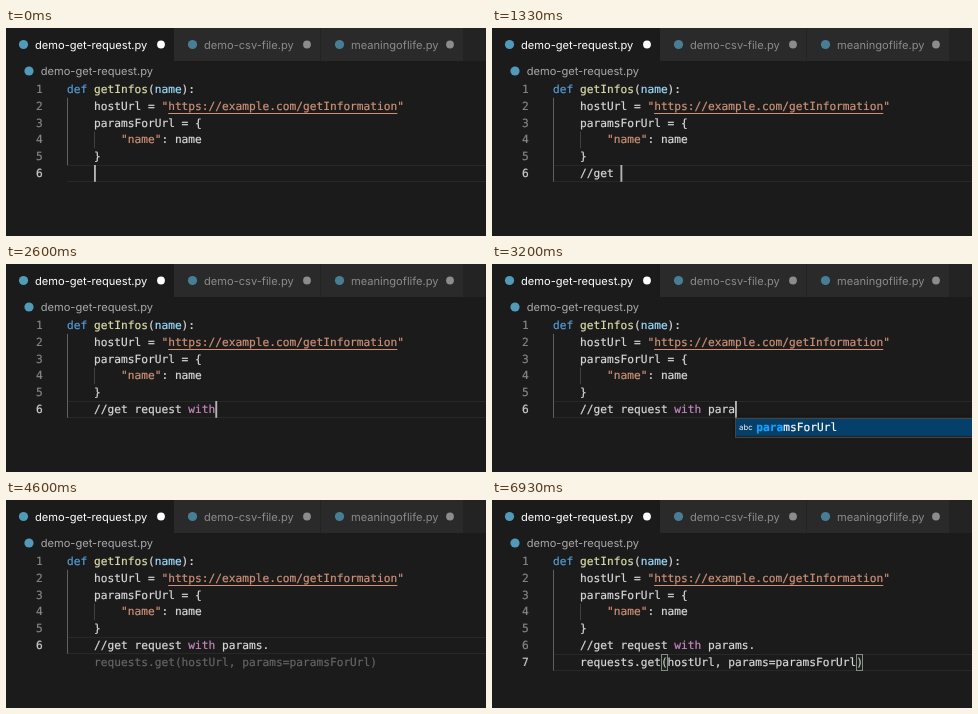
Animation of 480x208 px, one loop 7270 ms. Source, as an HTML page with a canvas:

```html
<!DOCTYPE html>
<html lang="en">
<head>
<meta charset="utf-8">
<title>Code completion</title>
<style>
  html, body { margin: 0; width: 100%; height: 100%; overflow: hidden; background: #1b1b1b; }
  canvas { display: block; width: 480px; height: 208px; }
</style>
</head>
<body>
<canvas id="stage"></canvas>
<script>
const LOOP = 7270;
const CHAR = 6.74, ROW = 16.8, LEFT = 88, TOP = 53;
const MONO = '11.2px "DejaVu Sans Mono", "Liberation Mono", monospace';
const UI = 'Inter, "DejaVu Sans", sans-serif';
const C = {
  bg: '#1b1b1b', tab: '#2a2a2a', strip: '#232323', text: '#d8d8d8', white: '#ffffff',
  keyword: '#569cd6', func: '#dcdcaa', param: '#9cdcfe', string: '#ce9178', flow: '#c586c0',
  ghost: '#656565', gutter: '#858585', active: '#cccccc', match: '#18a3ff', pick: '#04406a',
  border: '#454545', cursor: '#b4b4b2', icon: '#519aba'
};

const canvas = document.getElementById('stage');
const ctx = canvas.getContext('2d');
const dpr = window.devicePixelRatio || 1;
canvas.width = 480 * dpr;
canvas.height = 208 * dpr;
ctx.scale(dpr, dpr);
ctx.textRendering = 'geometricPrecision';

// Typed comment and the moment each character lands.
const COMMENT = '//get request with params.';
const KEYS = [
  730, 800, 1000, 1070, 1200, 1270, 1400, 1470, 1730,
  1870, 1930, 2000, 2130, 2200, 2330, 2400, 2530, 2600,
  2800, 2870, 3000, 3130, 3200, 3330, 3470, 3730
];
const CALL = 'requests.get(hostUrl, params=paramsForUrl)';
const GHOST_AT = 4600, BAR_AT = 5000, ACCEPT_AT = 6470, BRACKETS_AT = 6530;

// Spans in which the cursor is dark.
const DARK = [[70, 470], [4200, 4730], [5200, 5730], [6200, 6470], [6930, LOOP]];

const CODE = [
  [0, [['def ', C.keyword], ['getInfos', C.func], ['(', C.text], ['name', C.param], ['):', C.text]]],
  [4, [['hostUrl = ', C.text], ['"https://example.com/getInformation"', C.string]]],
  [4, [['paramsForUrl = {', C.text]]],
  [8, [['"name"', C.string], [': name', C.text]]],
  [4, [['}', C.text]]]
];

const colX = col => LEFT + (col - 4) * CHAR;
const rowY = line => TOP + (line - 1) * ROW;

function rect(x, y, w, h, color) {
  ctx.fillStyle = color;
  ctx.fillRect(x, y, w, h);
}

function dot(x, y, r, color) {
  ctx.fillStyle = color;
  ctx.beginPath();
  ctx.arc(x, y, r, 0, Math.PI * 2);
  ctx.fill();
}

// Monospaced text on an exact grid, slightly thickened; y is the top of the row.
function mono(str, x, y, color, bold) {
  ctx.font = (bold ? 'bold ' : '') + MONO;
  ctx.fillStyle = ctx.strokeStyle = color;
  ctx.lineWidth = 0.2;
  [...str].forEach((ch, i) => {
    ctx.fillText(ch, x + i * CHAR, y + 12.05);
    ctx.strokeText(ch, x + i * CHAR, y + 12.05);
  });
}

function tokens(list, x, y) {
  for (const [str, color] of list) {
    mono(str, x, y, color);
    x += str.length * CHAR;
  }
}

function label(str, x, y, size, color) {
  ctx.font = `${size}px ${UI}`;
  ctx.fillStyle = color;
  ctx.fillText(str, x, y);
}

function tab(x, w, name, textX, dotX, active) {
  rect(x, 0, w, 33, active ? C.bg : C.tab);
  ctx.globalAlpha = active ? 1 : 0.75;
  dot(textX - 11.5, 16.5, 4.6, C.icon);
  ctx.globalAlpha = 1;
  label(name, textX, 20.6, 11.1, active ? C.white : '#8b8b8b');
  dot(dotX, 16.5, 3.9, active ? C.white : '#8c8c8c');
}

function drawHeader() {
  rect(0, 0, 480, 33, C.strip);
  tab(0, 168, 'demo-get-request.py', 29, 155, true);
  tab(168, 146, 'demo-csv-file.py', 198, 301, false);
  tab(315, 142, 'meaningoflife.py', 345, 444, false);
  dot(23, 43, 4.6, C.icon);
  label('demo-get-request.py', 34.7, 47, 11.1, '#a9a9a9');
}

// The indent guide reaches only the lines that hold text.
function drawCode(line, lastFilled) {
  const top = rowY(line);
  rect(61, Math.round(top), 419, 1, '#282828');
  rect(61, Math.round(top + ROW) - 1, 419, 1, '#282828');
  rect(61, rowY(2), 1, (lastFilled - 1) * ROW, '#606060');
  rect(LEFT, rowY(4), 1, ROW, '#404040');
  CODE.forEach(([col, list], i) => tokens(list, colX(col), rowY(i + 1)));
  rect(colX(15), 85, 34 * CHAR, 1, C.string);
  for (let n = 1; n <= line; n++) {
    mono(String(n), 30, rowY(n), n === line ? C.active : C.gutter);
  }
}

function drawComment(count) {
  const typed = COMMENT.slice(0, count);
  const list = count < 18
    ? [[typed, C.text]]
    : [[typed.slice(0, 14), C.text], ['with', C.flow], [typed.slice(18), C.text]];
  tokens(list, LEFT, rowY(6));
}

function suggestions(count) {
  if (count >= 3 && count <= 5) return [count - 2, ['getInformation', 'getInfos']];
  if (count === 7 || count === 8) return [count - 6, ['return', 'reader', 'read']];
  if (count === 20) return [1, ['paramsForUrl', 'print']];
  if (count > 20 && count < 26) return [count - 19, ['paramsForUrl']];
  return null;
}

function drawPopup(x, [matched, words]) {
  const y = Math.round(rowY(7)), h = Math.round(words.length * ROW + 2);
  ctx.save();
  ctx.shadowColor = 'rgba(0,0,0,.5)';
  ctx.shadowBlur = 4;
  rect(x, y, 500, h, C.strip);
  ctx.restore();
  ctx.strokeStyle = C.border;
  ctx.lineWidth = 1;
  ctx.strokeRect(Math.round(x) + 0.5, y + 0.5, 500, h);
  words.forEach((word, i) => {
    const top = y + 1 + i * ROW;
    if (!i) rect(x + 1, top, 500, ROW, C.pick);
    label('abc', x + 4, top + 11, 7.8, '#eeeeee');
    mono(word.slice(0, matched), x + 21.3, top - 0.4, C.match, true);
    mono(word.slice(matched), x + 21.3 + matched * CHAR, top - 0.4, i ? C.text : C.white);
  });
}

function drawBar(t) {
  ctx.globalAlpha = Math.min(1, 0.35 + (t - BAR_AT) / 200);
  rect(263, 117, 217, 20, C.strip);
  rect(263, 117, 217, 1, C.border);
  rect(263, 136, 217, 1, C.border);
  rect(263, 117, 1, 20, C.border);
  label('Next (⇧⌥6)', 272, 131.8, 10.4, '#28527d');
  label('Previous (⇧⌥5)', 348, 131.8, 10.4, '#28527d');
  label('Accept', 443.5, 131.8, 10.4, '#3794ff');
  ctx.globalAlpha = 1;
}

function bracket(index) {
  const x = Math.round(LEFT + index * CHAR), y = Math.round(rowY(7));
  rect(x, y, 7, 17, 'rgba(0,100,0,.1)');
  ctx.strokeStyle = '#888888';
  ctx.lineWidth = 1;
  ctx.strokeRect(x + 0.5, y + 0.5, 6, 16);
}

function draw(t) {
  const count = KEYS.filter(k => k <= t).length;
  const accepted = t >= ACCEPT_AT;
  const line = accepted ? 7 : 6;
  const cursorX = LEFT + (accepted ? CALL.length : count) * CHAR;

  rect(0, 0, 480, 208, C.bg);
  drawHeader();
  drawCode(line, count ? line : 5);
  drawComment(count);
  if (t >= GHOST_AT) mono(CALL, LEFT, rowY(7), accepted ? C.text : C.ghost);
  if (t >= BRACKETS_AT) [12, CALL.length - 1].forEach(bracket);
  if (t >= BAR_AT && !accepted) drawBar(t);
  if (!DARK.some(([a, b]) => t >= a && t < b)) {
    rect(cursorX, rowY(line), 1.87, ROW, C.cursor);
  }
  const hints = suggestions(count);
  if (hints) drawPopup(cursorX, hints);
}

const start = performance.now();
function tick() {
  draw((performance.now() - start) % LOOP);
  requestAnimationFrame(tick);
}
tick();
</script>
</body>
</html>
```
